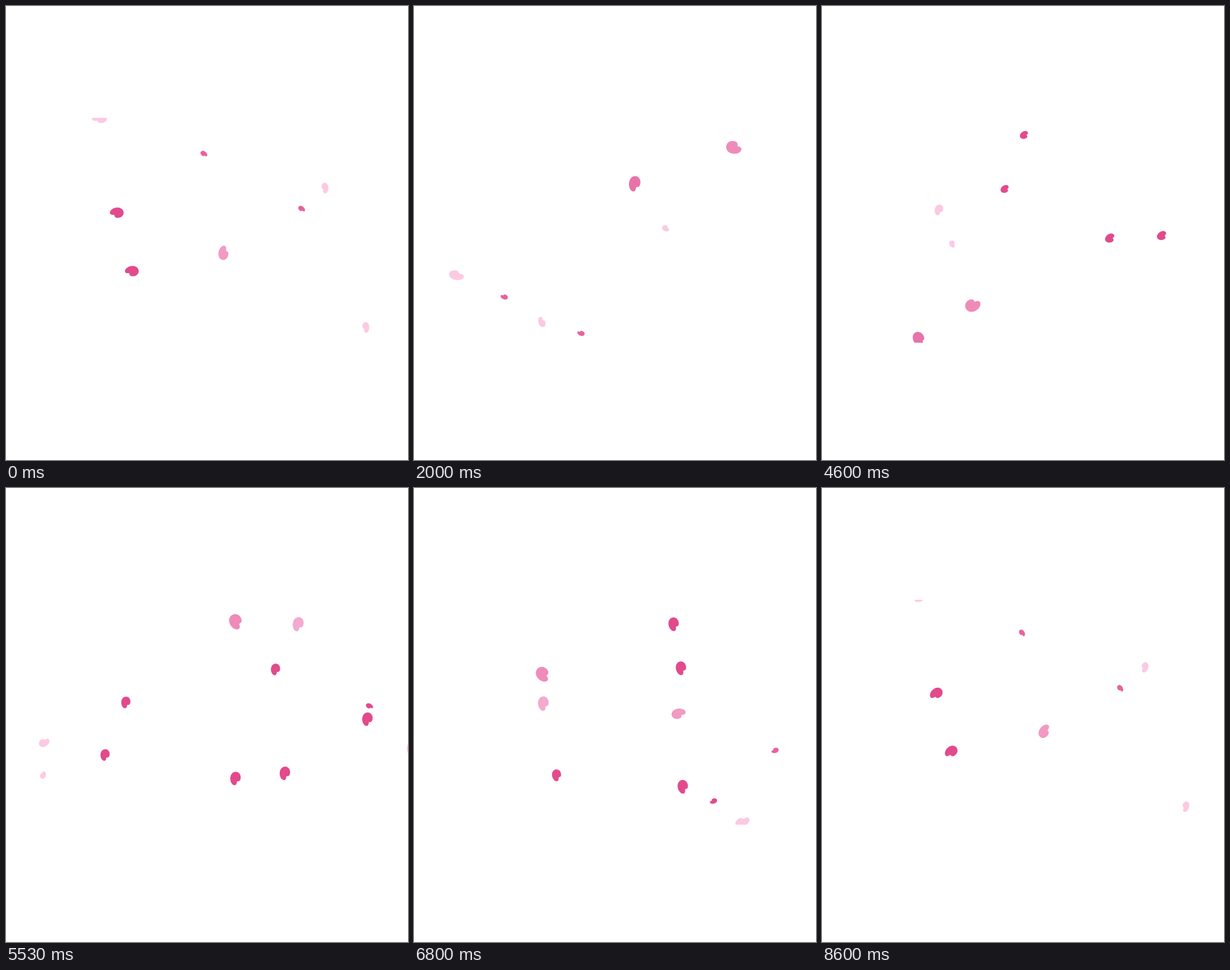
Write an HTML page with a canvas that moves like this. It is 658 by 743 pixels and loops after 8630 ms.

```html
<!DOCTYPE html>
<html lang="en">
<head>
<meta charset="utf-8">
<title>Falling petals</title>
<style>
  html, body { margin: 0; width: 100%; height: 100%; overflow: hidden; background: #fff; }
  canvas { display: block; width: 658px; height: 743px; }
</style>
</head>
<body>
<canvas id="stage" width="658" height="743"></canvas>
<script>
const ctx = document.getElementById('stage').getContext('2d');
const LOOP = 8630, STEPS = 216, FLIPS = 14;
const TOP = 183, BOTTOM = 551;
const DARK = '#e24a8c', ROSE = '#e8629e', PALE = '#fcc9e3';
const rad = deg => deg * Math.PI / 180;
const mod = (n, m) => ((n % m) + m) % m;

// Each kind turns a whole number of times per loop (spins) from its phase.
// Its petals pass [x, y, heading] at step `at`, drift at one speed in px per
// step and may veer by some degrees per step.
const dark = { color: DARK, length: 22, width: 16.5, flip: .4, phase: 180, spins: 20, veer: .26 };
const small = { color: ROSE, length: 12, width: 8, notch: 50, phase: 35, spins: -11, speed: 5.86 };
const blush = { phase: 242, spins: -7, at: 138 };
const pale = { color: PALE, notch: -60 };

const kinds = [
  { ...dark, at: 170, speed: 5.86, petals: [
    [227, 590, 146.5], [303, 575, 149], [440, 489, 148], [425, 223, 148.7], [437, 295, 143]
  ] },
  { ...dark, length: 19, width: 14.5, at: 138, speed: 8.45, petals: [
    [196, 351, 137], [162, 437, 138], [441, 297, 136]
  ] },
  { ...small, at: 0, petals: [[324, 242, 127], [484, 332, 136], [425, 642, 128]] },
  { ...small, color: DARK, at: 138, petals: [[595, 357, 124]] },
  { ...blush, color: '#ef8bb9', length: 25, width: 20, speed: 5.82,
    petals: [[149, 581, 137], [376, 219, 152.5]] },
  { ...blush, color: '#e873a8', length: 25, width: 18, phase: 325, at: 50, speed: 5, veer: .26,
    petals: [[361, 291, 120]] },
  { ...blush, color: '#f4a9cf', length: 23, width: 17, phase: 274, speed: 9.26,
    petals: [[478, 223, 154]] },
  { color: '#f29ac3', length: 23, width: 16, notch: 55, phase: 275, spins: -15, at: 0, speed: 10,
    petals: [[356, 404, 143], [43, 613, 148]] },
  { ...pale, length: 17, width: 11, notch: 65, phase: 85, spins: -11, at: 0, speed: 7.64,
    petals: [[522, 298, 145], [589, 526, 145]] },
  { ...pale, length: 24, width: 15, phase: 180, spins: -2, at: 0, speed: 5.4,
    petals: [[153, 184, 108], [356, 716, 137]] },
  { ...pale, length: 12, width: 9, phase: 37, spins: -13, at: 50, speed: 7.5,
    petals: [[412, 364, 136], [645, 163, 152.3]] },
  { ...pale, length: 18, width: 13, phase: 82, spins: -13, at: 88, speed: 6.64,
    petals: [[342, 237, 147.3]] }
];

// An ellipse with one soft dent in its outline
function petalShape(length, width, notch) {
  const path = new Path2D();
  for (let deg = 0; deg < 360; deg += 5) {
    const away = mod(deg - notch + 180, 360) - 180;
    const r = .51 * (1 - .4 * Math.exp(-((away / 20) ** 2)));
    const c = Math.cos(rad(deg)), s = Math.sin(rad(deg));
    path.lineTo(length * r * c, width * r * s * (1 - .1 * c));
  }
  path.closePath();
  return path;
}
for (const kind of kinds) {
  kind.shape = petalShape(kind.length, kind.width, kind.notch ?? -50);
}

// 25 drawings a second shown on a 30 Hz grid: every sixth tick holds
function stepAt(ms) {
  const tick = Math.floor((ms + 5) * 30 / 1000);
  return Math.min(STEPS - 1, 5 * Math.floor(tick / 6) + Math.max(0, tick % 6 - 1));
}

function drawKind({ color, shape, flip = 0, phase, spins, at, speed, veer = 0, petals }, step) {
  const turn = 360 * step / STEPS;
  const squash = 1 - flip * (1 - Math.cos(rad(FLIPS * turn))) / 2;
  const d = mod(step - at + STEPS / 2, STEPS) - STEPS / 2;
  ctx.fillStyle = color;
  for (const [x, y, heading] of petals) {
    const way = rad(heading + veer * d / 2);
    ctx.save();
    ctx.translate(x + speed * d * Math.cos(way), y + speed * d * Math.sin(way));
    ctx.rotate(rad(phase + spins * turn));
    ctx.scale(squash, 1);
    ctx.fill(shape);
    ctx.restore();
  }
}

function draw(step) {
  ctx.fillStyle = '#fff';
  ctx.fillRect(0, 0, 658, 743);
  ctx.save();
  ctx.beginPath();
  ctx.rect(0, TOP, 658, BOTTOM - TOP);
  ctx.clip();
  for (const kind of kinds) drawKind(kind, step);
  ctx.restore();
}

const begin = performance.now();
function frame() {
  draw(stepAt((performance.now() - begin) % LOOP));
  requestAnimationFrame(frame);
}
frame();
</script>
</body>
</html>
```
